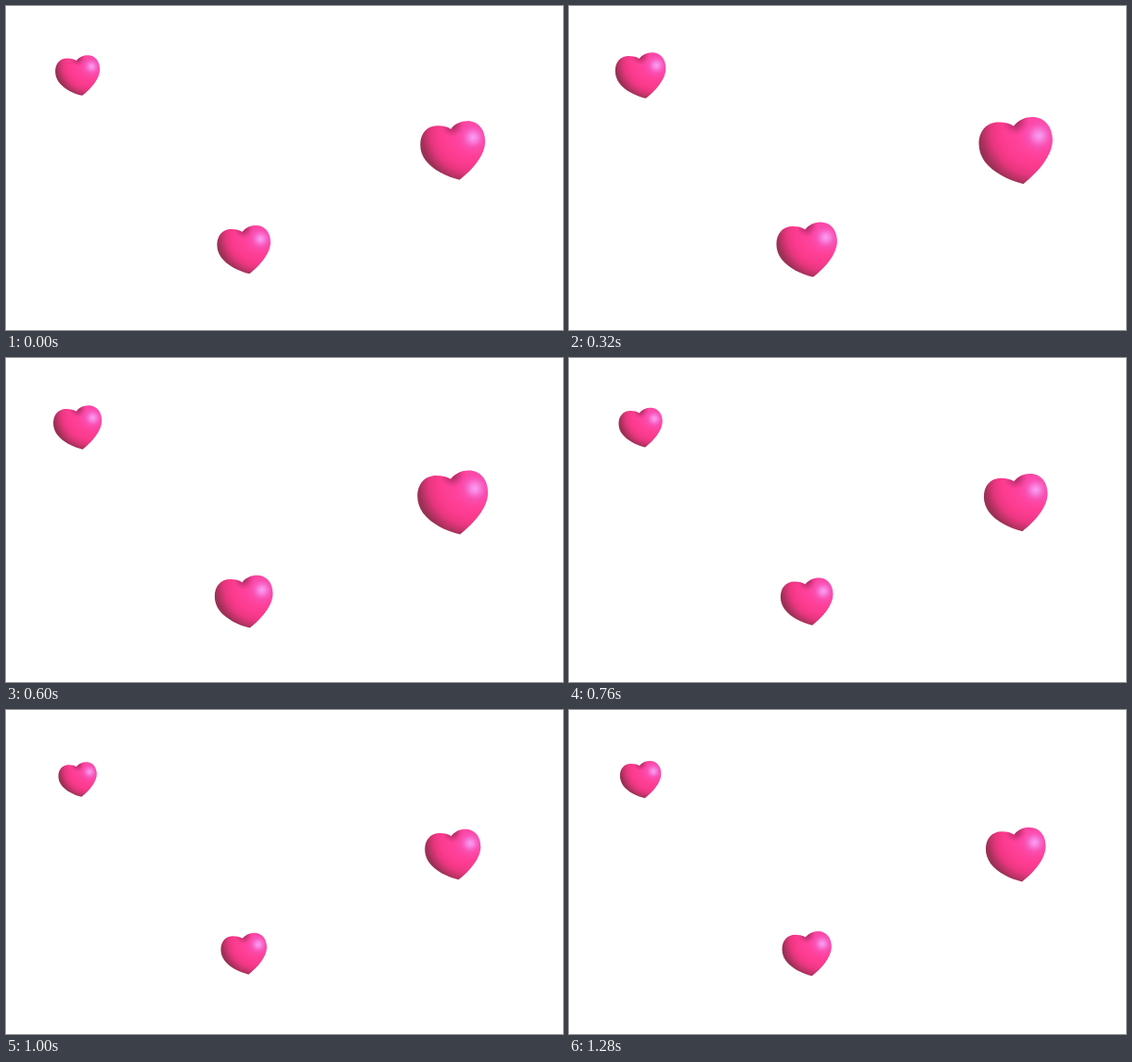
Recreate the animation shown at these times as an HTML page with a canvas. Size 600 by 350 pixels, loop 1.32 s.

```html
<!DOCTYPE html>
<html lang="en">
<head>
<meta charset="utf-8">
<title>Pulsing hearts</title>
<style>
  html, body { margin: 0; width: 100%; height: 100%; overflow: hidden; background: #fff; }
  canvas { display: block; }
</style>
</head>
<body>
<canvas id="stage" width="600" height="350"></canvas>
<script>
const ctx = document.getElementById('stage').getContext('2d');
const LOOP = 1320, STEP = 40, PEAK = 404;

const heart = new Path2D(`M-2.5-26.5 C3-33 10-36.3 18-36.3 C31-36.3 39.8-26 39.8-11
  C39.8 6 24 24 8.2 36.5 C-8 32.5 -25 24 -34 12 C-38 6.5 -40.3 0 -40.3-7
  C-40.3-21 -32-30.7 -19-30.7 C-12-30.7 -7-29.3 -2.5-26.5Z`);

function glow(x, y, radius, stops) {
  const gradient = ctx.createRadialGradient(x, y, 0, x, y, radius);
  stops.forEach(([at, color]) => gradient.addColorStop(at, color));
  return gradient;
}

const layers = [
  // body, darkening towards the lower left rim
  glow(22, -22, 68, [[0, '#ff48a4'], [.4, '#ff4098'], [.6, '#f93a8c'], [.72, '#e8367f'],
    [.82, '#c23369'], [.9, '#9f3057'], [1, '#8f3352']]),
  // crease between the lobes
  glow(0, -31, 15, [[0, 'rgba(135,40,80,.8)'], [.5, 'rgba(170,40,95,.5)'], [1, 'rgba(210,45,120,0)']]),
  // lilac sheen on the right lobe
  glow(25, -16, 26, [[0, 'rgba(248,165,248,.95)'], [.2, 'rgba(246,140,232,.85)'],
    [.5, 'rgba(244,90,195,.5)'], [1, 'rgba(250,64,160,0)']]),
];

// x, y, size
const hearts = [[77.2, 75, .687], [256.3, 263.1, .824], [481.4, 156, 1]];

function draw(now) {
  const t = Math.max(74, Math.floor(now % LOOP / STEP) * STEP);
  const pulse = .872 + .128 * Math.cos((t - PEAK) / LOOP * 2 * Math.PI);
  ctx.clearRect(0, 0, 600, 350);
  for (const [x, y, size] of hearts) {
    ctx.save();
    ctx.translate(x, y);
    ctx.scale(size * pulse, size * pulse);
    for (const layer of layers) {
      ctx.fillStyle = layer;
      ctx.fill(heart);
    }
    ctx.restore();
  }
}

let start;
function tick(now) {
  start ??= now;
  draw(now - start);
  requestAnimationFrame(tick);
}
draw(0);
requestAnimationFrame(tick);
</script>
</body>
</html>
```
